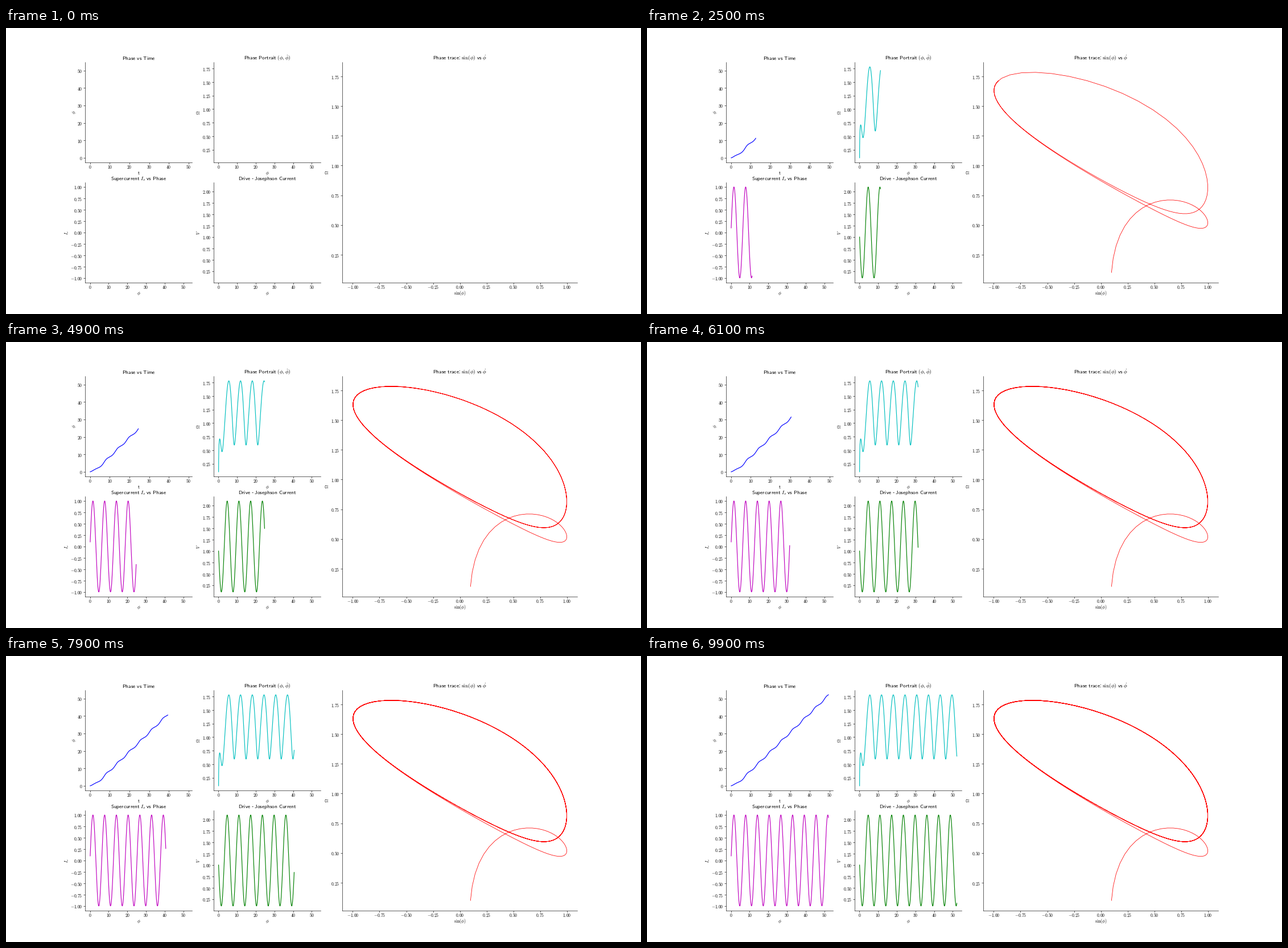
A matplotlib script that plays this animation: 1116x502 px, repeating every 10000 ms.

```python
import numpy as np
import matplotlib.pyplot as plt
from matplotlib.animation import FuncAnimation
from matplotlib.gridspec import GridSpec
from matplotlib.transforms import ScaledTranslation

FRAMES, INTERVAL, STEP = 100, 100, 5
DRIVE, DAMPING, OFFSET = 1.5, 1.2, 1.1

plt.rcParams["mathtext.fontset"] = "cm"
plt.rcParams["font.family"] = "Liberation Sans"


def slope(state):
    phi, omega = state
    return np.array([omega, DRIVE - np.sin(phi) - DAMPING * omega])


def integrate(times, state, substeps=4):
    """Damped, driven junction phase by Runge-Kutta."""
    h = (times[1] - times[0]) / substeps
    path = [state]
    for _ in times[1:]:
        for _ in range(substeps):
            k1 = slope(state)
            k2 = slope(state + h / 2 * k1)
            k3 = slope(state + h / 2 * k2)
            k4 = slope(state + h * k3)
            state = state + h / 6 * (k1 + 2 * k2 + 2 * k3 + k4)
        path.append(state)
    return np.array(path).T


def sans(text):
    return r"$\mathsf{%s}$" % text.replace(" ", r"\hspace{0.38}")


def limits(values, margin=0.05):
    pad = margin * np.ptp(values)
    return values.min() - pad, values.max() + pad


def labels(ticks, fmt):
    return [r"$\mathrm{%s}$" % format(v, fmt) for v in ticks]


def widest(ticks, fmt):
    """Width in points of the longest tick label."""
    advance = {".": 2.78, "-": 7.78}
    return max(sum(advance.get(c, 5) for c in format(v, fmt)) for v in ticks)


def put_label(ax, axis, text, x, y, dx, dy):
    """Axis label with its baseline a fixed distance in points from the axes."""
    shift = ScaledTranslation(dx / 72, dy / 72, ax.figure.dpi_scale_trans)
    axis.set_label_text(text, fontsize=10, va="baseline")
    axis.set_label_coords(x, y, transform=ax.transAxes + shift)


t = np.arange(0, 50, 0.1)
phi, omega = integrate(t, np.array([0.1, 0.1]))
shown = STEP * (FRAMES - 1) + 1
t, phi, omega = t[:shown], phi[:shown], omega[:shown]
current = np.sin(phi)

fig = plt.figure(figsize=(20, 9), dpi=55.8, facecolor="white")
grid = GridSpec(2, 4, figure=fig, left=0.1249)

tens = np.arange(0, 51, 10)
quarters = np.arange(0.25, 2.01, 0.25)
signed = np.arange(-1, 1.01, 0.25)
whole, fine = "d", ".2f"

# cell, x, y, colour, width, title, x label, y label, x ticks, y ticks
panels = [
    (grid[0, 0], t, phi, "b", 1.5, sans("Phase vs Time"),
     sans("t"), r"$\phi$", (tens, whole), (tens, whole)),
    (grid[0, 1], phi, omega, "c", 1.5,
     sans("Phase Portrait") + r" $(\phi,\dot{\phi})$",
     r"$\phi$", r"$\Omega$", (tens, whole), (quarters[:-1], fine)),
    (grid[1, 0], phi, current, "m", 1.5,
     sans("Supercurrent") + " $I_s$ " + sans("vs Phase"),
     r"$\phi$", "$I_s$", (tens, whole), (signed, fine)),
    (grid[1, 1], phi, OFFSET - current, "g", 1.5,
     sans("Drive") + " - " + sans("Josephson Current"),
     r"$\phi$", "$V$", (tens, whole), (quarters, fine)),
    (grid[:, 2:], current, omega, "r", 1,
     sans("Phase trace") + r": $\sin(\phi)$ " + sans("vs") + r" $\dot{\phi}$",
     r"$\sin(\phi)$", r"$\Omega$", (signed, fine), (quarters[:-1], fine)),
]

curves = []
for cell, x, y, color, width, title, xlabel, ylabel, xt, yt in panels:
    ax = fig.add_subplot(cell)
    ax.spines[["top", "right"]].set_visible(False)
    ax.set_title(title, fontsize=12)
    ax.tick_params(axis="x", pad=10.4)
    ax.tick_params(axis="y", pad=2.5)
    ax.set_xticks(xt[0], labels(*xt), fontsize=10, va="baseline")
    ax.set_yticks(yt[0], labels(*yt), fontsize=10)
    put_label(ax, ax.xaxis, xlabel, 0.5, 0, 0, -26.8)
    put_label(ax, ax.yaxis, ylabel, 0, 0.5, -13 - widest(*yt), 0)
    ax.set_xlim(limits(x))
    ax.set_ylim(limits(y))
    line, = ax.plot([], [], color=color, lw=width)
    curves.append((line, x, y))


def draw(frame):
    n = STEP * frame + 1
    for line, x, y in curves:
        line.set_data(x[:n], y[:n])
    return [line for line, _, _ in curves]


def start():
    return draw(0)


anim = FuncAnimation(fig, draw, frames=FRAMES, interval=INTERVAL,
                     init_func=start, repeat=True, repeat_delay=0)
plt.show()
```
